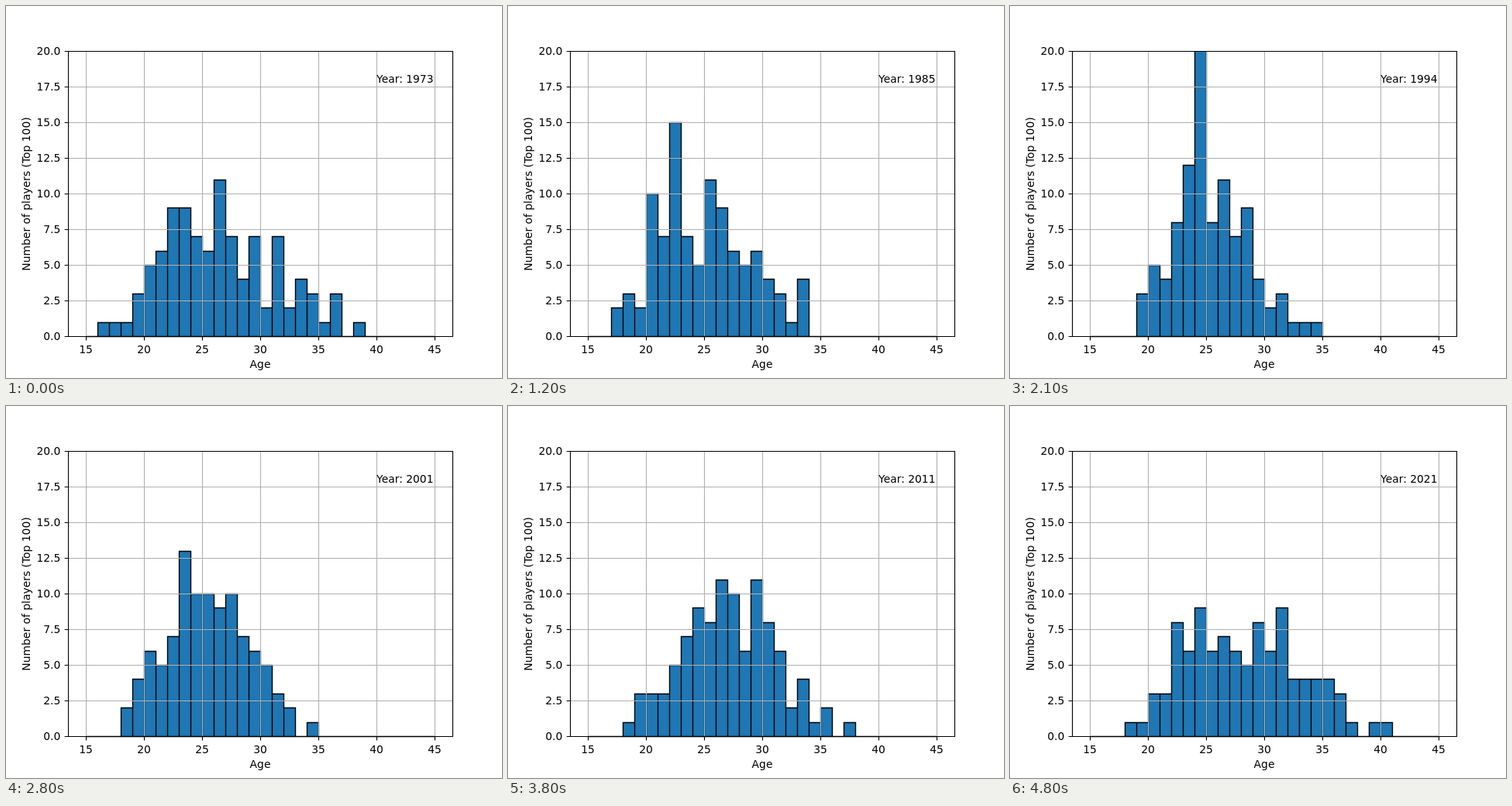
Recreate the animation shown at these times as an HTML page. Size 640x480 px, loop 4.9 s.

```html
<!DOCTYPE html>
<html lang="en">
<head>
<meta charset="utf-8">
<title>Age of players by year</title>
<style>
  html, body { margin: 0; width: 100%; height: 100%; overflow: hidden; background: #fff; }
  svg { display: block; width: 640px; height: 480px; font: 13.89px "DejaVu Sans", sans-serif; }
  path { fill: none; stroke: #000; stroke-width: 1.11; }
  #bars { fill: #1f77b4; stroke-width: 1.39; }
  #grid { stroke: #b0b0b0; }
</style>
</head>
<body>
<svg viewBox="0 0 640 480">
  <clipPath id="plot"><rect x="80" y="58" width="496" height="370"/></clipPath>
  <g clip-path="url(#plot)"><path id="bars"/><path id="grid"/></g>
  <path id="ticks"/>
  <path d="M80.5 58.5H576.5V426.5H80.5Z"/>
  <g id="labels"></g>
  <text x="328" y="467" text-anchor="middle">Age</text>
  <text transform="translate(31 242.5) rotate(-90)" text-anchor="middle">Number of players (Top 100)</text>
  <text id="year" x="478" y="99"></text>
</svg>
<script>
const el = id => document.getElementById(id);
const snap = v => Math.floor(v + 0.5) + 0.5;
const px = age => snap(80 + (age - 13.5) * 496 / 33);
const py = count => snap(426 - count * 18.4);

// Each row: year, youngest age, then the count for every age from there on.
const surveys = [
  [1973, 16, 1, 1, 1, 3, 5, 6, 9, 9, 7, 6, 11, 7, 4, 7, 2, 7, 2, 4, 3, 1, 3],
  [1985, 17, 2, 3, 2, 10, 7, 15, 7, 5, 11, 9, 6, 5, 6, 4, 3, 1, 4],
  [1994, 19, 3, 5, 4, 8, 12, 21, 8, 11, 7, 9, 4, 2, 3, 1, 1, 1],
  [2001, 18, 2, 4, 6, 5, 7, 13, 10, 10, 9, 10, 7, 6, 5, 3, 2, 0, 1],
  [2007, 18, 2, 2, 5, 4, 8, 8, 7, 13, 13, 11, 4, 9, 3, 4, 2, 3, 1, 1],
  [2015, 18, 2, 2, 2, 2, 3, 6, 6, 6, 9, 11, 11, 10, 10, 7, 2, 7, 2, 1, 1],
  [2021, 18, 1, 1, 3, 3, 8, 6, 9, 6, 7, 6, 5, 8, 6, 9, 4, 4, 4, 4, 3, 1, 0, 1, 1]
].map(([year, first, ...counts]) => ({ year, at: age => counts[age - first] || 0 }));

const trend = (s, age) => [-2, -1, 0, 1, 2].reduce((sum, d) => sum + s.at(age + d), 0) / 5;
const bump = (s, age) => s.at(age) - trend(s, age);

// The broad shape blends between surveys; its bumps grow one year older each year.
function count(age, year) {
  const next = Math.max(1, surveys.findIndex(s => s.year >= year));
  const a = surveys[next - 1], b = surveys[next];
  const t = (year - a.year) / (b.year - a.year);
  const value = (1 - t) * (trend(a, age) + bump(a, age - year + a.year))
              + t * (trend(b, age) + bump(b, age + b.year - year));
  const veteran = year < 1980 && age === year - 1935;
  return Math.max(veteran ? 1 : 0, Math.round(value));
}

let grid = "", ticks = "", labels = "";
for (let age = 15; age <= 45; age += 5) {
  const x = px(age);
  grid += `M${x} 58V427`;
  ticks += `M${x} 426.5V431.4`;
  labels += `<text x="${x - 0.5}" y="448" text-anchor="middle">${age}</text>`;
}
for (let n = 0; n <= 20; n += 2.5) {
  const y = py(n);
  grid += `M80 ${y}H576`;
  ticks += `M80.5 ${y}H75.6`;
  labels += `<text x="70.3" y="${y + 4.5}" text-anchor="end">${n.toFixed(1)}</text>`;
}
el("grid").setAttribute("d", grid);
el("ticks").setAttribute("d", ticks);
el("labels").innerHTML = labels;

let shown;
function draw() {
  const year = 1973 + Math.floor(performance.now() / 100) % 49;
  if (year !== shown) {
    shown = year;
    let bars = "";
    for (let age = 15; age < 45; age++)
      bars += `M${px(age)} ${py(0)}V${py(count(age, year))}H${px(age + 1)}V${py(0)}Z`;
    el("bars").setAttribute("d", bars);
    el("year").textContent = "Year: " + year;
  }
  requestAnimationFrame(draw);
}
draw();
</script>
</body>
</html>
```
